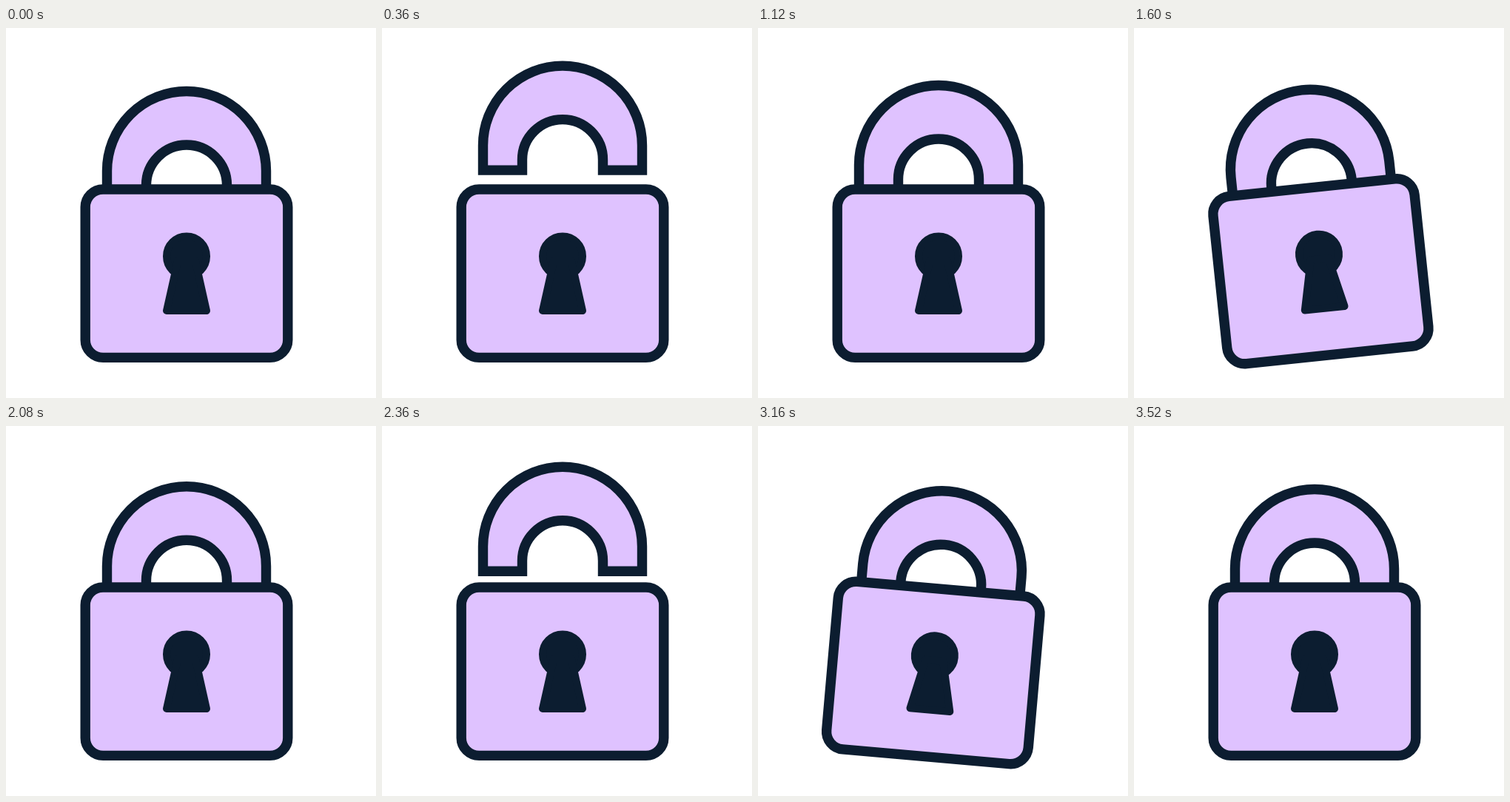
These frames come from a looping animation (500x500 px, 3880 ms). An HTML page:

```html
<!DOCTYPE html>
<html lang="en">
<head>
<meta charset="utf-8">
<title>Padlock</title>
<style>
  html, body { margin: 0; width: 100%; height: 100%; overflow: hidden; background: #fff; }
  svg { display: block; width: 100%; height: 100%; }
  .outlined { fill: #dfc2ff; stroke: #0c1d30; stroke-width: 13.4; }
  .keyhole { fill: #0c1d30; stroke: #0c1d30; stroke-width: 10; stroke-linejoin: round; }
</style>
</head>
<body>
<svg viewBox="0 0 500 500">
  <g id="lock">
    <path id="shackle" class="outlined"
      d="M136.5 226.5V193a107.5 107.5 0 0 1 215 0V226.5H298.5V212.5a54.5 54.5 0 0 0-109 0V226.5Z"/>
    <rect class="outlined" x="107.2" y="218" width="273.6" height="227.4" rx="24"/>
    <g class="keyhole">
      <circle cx="244" cy="308.5" r="27"/>
      <path d="M232 315H256L271 382H217Z"/>
    </g>
  </g>
</svg>
<script>
  const LOOP = 3880, STEP = 40;
  const lock = document.getElementById('lock');
  const shackle = document.getElementById('shackle');

  // Linear rise from start to peak, then linear fall until end.
  const pulse = (t, start, peak, end, size) =>
    size * Math.max(0, Math.min((t - start) / (peak - start), (end - t) / (end - peak)));

  function draw(now) {
    const t = Math.floor((now % LOOP) / STEP) * STEP;
    const lift = pulse(t, 0, 440, 1280, 42) + pulse(t, 2040, 2400, 2960, 34);
    const tilt = pulse(t, 3080, 3240, 3520, 10) - pulse(t, 1280, 1440, 1760, 12);
    shackle.setAttribute('transform', `translate(0 ${-lift})`);
    lock.setAttribute('transform', `rotate(${tilt} 220 250)`);
  }

  const begin = performance.now();
  function tick() {
    draw(performance.now() - begin);
    requestAnimationFrame(tick);
  }
  tick();
</script>
</body>
</html>
```
